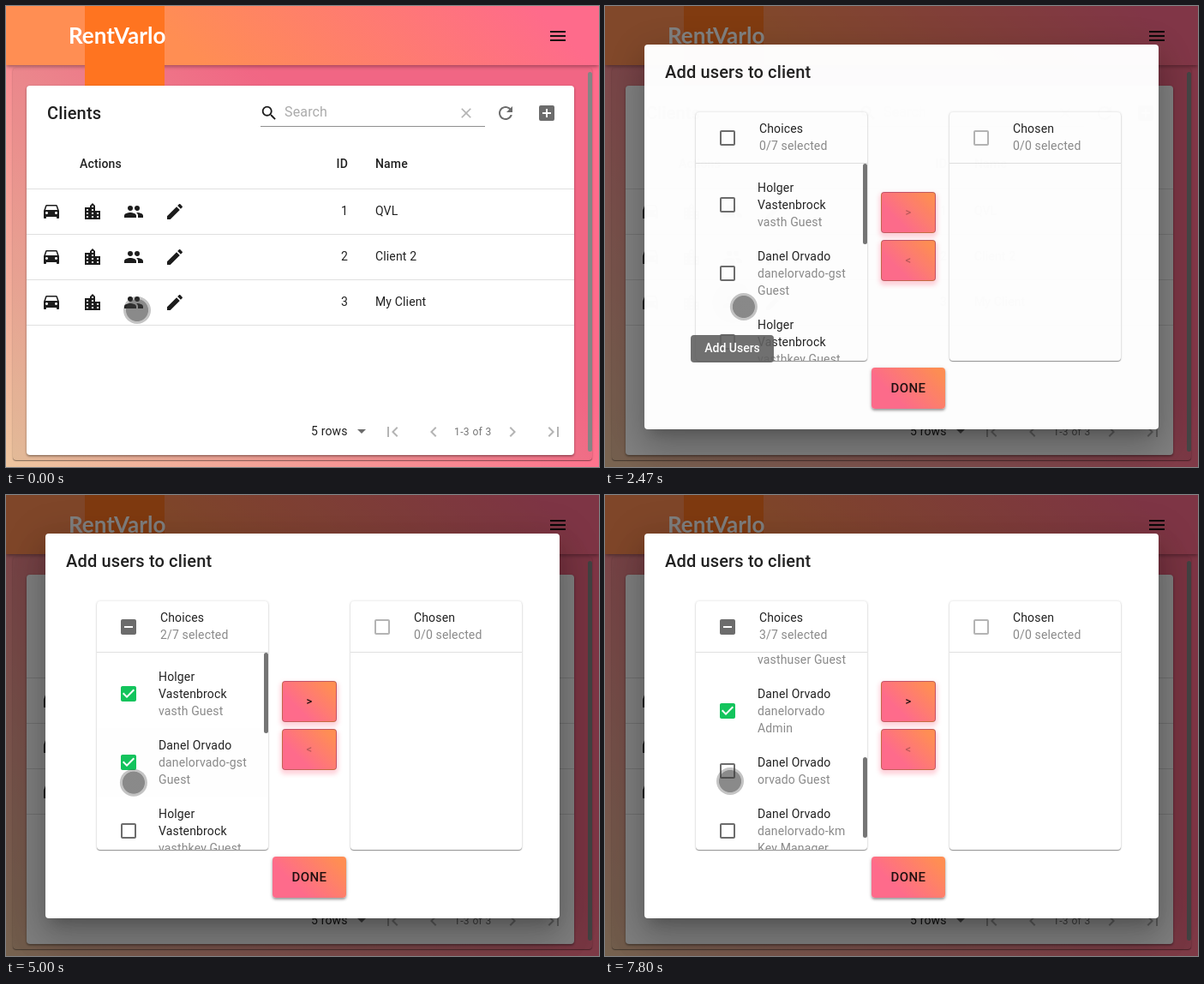
Recreate the animation shown at these times as an HTML page. Size 692 by 538 pixels, loop 8000 ms.

```html
<!DOCTYPE html>
<html lang="en">
<head>
<meta charset="utf-8">
<title>Add users to client</title>
<style>
html, body { margin: 0; width: 100%; height: 100%; overflow: hidden; }
body {
  position: relative;
  font: 14px/20px Roboto, sans-serif;
  letter-spacing: .01071em;
  color: rgba(0,0,0,.87);
  background: linear-gradient(45deg, #eec6a0, #fe6b8b 62%);
}
div, svg { position: absolute; }
.text { white-space: pre; }
.title { font-size: 20px; font-weight: 500; letter-spacing: .0075em; }
.strong { font-weight: 500; }
.muted { color: #8a8a8a; }
.header { background: linear-gradient(45deg, #ff8e53 30%, #fe6b8b 90%); box-shadow: 0 2px 4px -1px rgba(0,0,0,.3), 0 1px 6px rgba(0,0,0,.2); }
.logo { background: #ff7420; }
.brand { font: 700 26px/20px Lato, sans-serif; letter-spacing: 0; color: #fff; }
.panel { background: rgba(0,0,0,.05); border-radius: 4px; box-shadow: 0 1px 1px rgba(0,0,0,.4), 0 0 3px rgba(0,0,0,.15); }
.bar { background: #858585; border-radius: 3px; }
.card { background: #fff; border-radius: 4px; box-shadow: 0 1px 3px rgba(0,0,0,.3), 0 2px 2px rgba(0,0,0,.14); }
.list { background: #fff; border-radius: 4px; box-shadow: 0 1px 1px rgba(0,0,0,.4), 0 0 3px rgba(0,0,0,.16); }
.line { background: #e0e0e0; }
.dialog { background: #fff; border-radius: 4px; box-shadow: 0 11px 15px -7px rgba(0,0,0,.2), 0 24px 38px 3px rgba(0,0,0,.14), 0 9px 46px 8px rgba(0,0,0,.12); }
.button { box-sizing: border-box; border-radius: 4px; text-align: center; font-weight: 500; letter-spacing: .02857em; background: linear-gradient(45deg, #fe6b8b 30%, #ff8e53 90%); }
.move { border: 1px solid rgba(0,0,0,.23); font-size: 13px; line-height: 46px; box-shadow: 0 3px 5px 2px rgba(255,105,135,.3); }
.done { font-size: 15px; line-height: 48px; box-shadow: 0 2px 3px rgba(0,0,0,.35), 0 1px 5px rgba(0,0,0,.12); }
.clip { overflow: hidden; }
.ripple { border-radius: 50%; background: rgba(0,0,0,.87); }
.tip { border-radius: 4px; background: rgba(97,97,97,.9); color: #fff; text-align: center; letter-spacing: 0; }
.cursor { border-radius: 50%; background: radial-gradient(circle, rgba(60,60,60,.6) 12.6px, rgba(60,60,60,.3) 13.4px); }
</style>
</head>
<body>
<script>
const paths = {
  car: 'M18.92 5.01C18.72 4.42 18.16 4 17.5 4h-11c-.66 0-1.21.42-1.42 1.01L3 11v8c0 .55.45 1 1 1h1c.55 0 1-.45 1-1v-1h12v1c0 .55.45 1 1 1h1c.55 0 1-.45 1-1v-8l-2.08-5.99zM6.5 15c-.83 0-1.5-.67-1.5-1.5S5.67 12 6.5 12s1.5.67 1.5 1.5S7.33 15 6.5 15zm11 0c-.83 0-1.5-.67-1.5-1.5s.67-1.5 1.5-1.5 1.5.67 1.5 1.5-.67 1.5-1.5 1.5zM5 10l1.5-4.5h11L19 10H5z',
  city: 'M15 11V5l-3-3-3 3v2H3v14h18V11h-6zm-8 8H5v-2h2v2zm0-4H5v-2h2v2zm0-4H5V9h2v2zm6 8h-2v-2h2v2zm0-4h-2v-2h2v2zm0-4h-2V9h2v2zm0-4h-2V5h2v2zm6 12h-2v-2h2v2zm0-4h-2v-2h2v2z',
  people: 'M16 11a3 3 0 1 0-3-3c0 1.66 1.34 3 3 3zm-8 0a3 3 0 1 0-3-3c0 1.66 1.34 3 3 3zm0 2c-2.33 0-7 1.17-7 3.5V19h14v-2.5c0-2.33-4.67-3.5-7-3.5zm8 0c-.29 0-.62.02-.97.05 1.16.84 1.97 1.97 1.97 3.45V19h6v-2.5c0-2.33-4.67-3.5-7-3.5z',
  edit: 'M3 17.25V21h3.75L17.81 9.94l-3.75-3.75L3 17.25zM20.71 7.04c.39-.39.39-1.02 0-1.41l-2.34-2.34c-.39-.39-1.02-.39-1.41 0l-1.83 1.83 3.75 3.75 1.83-1.83z',
  search: 'M15.5 14h-.79l-.28-.27C15.41 12.59 16 11.11 16 9.5A6.5 6.5 0 1 0 9.5 16c1.61 0 3.09-.59 4.23-1.57l.27.28v.79l5 4.99L20.49 19l-4.99-5zm-6 0a4.5 4.5 0 1 1 0-9 4.5 4.5 0 0 1 0 9z',
  clear: 'M19 6.41L17.59 5 12 10.59 6.41 5 5 6.41 10.59 12 5 17.59 6.41 19 12 13.41 17.59 19 19 17.59 13.41 12z',
  refresh: 'M17.65 6.35C16.2 4.9 14.21 4 12 4c-4.42 0-7.99 3.58-7.99 8s3.57 8 7.99 8c3.73 0 6.84-2.55 7.73-6h-2.08c-.82 2.33-3.04 4-5.65 4-3.31 0-6-2.69-6-6s2.69-6 6-6c1.66 0 3.14.69 4.22 1.78L13 11h7V4l-2.35 2.35z',
  add: 'M5 3h14a2 2 0 0 1 2 2v14a2 2 0 0 1-2 2H5a2 2 0 0 1-2-2V5a2 2 0 0 1 2-2zm12 10v-2h-4V7h-2v4H7v2h4v4h2v-4z',
  first: 'M18.41 16.59L13.82 12l4.59-4.59L17 6l-6 6 6 6zM6 6h2v12H6z',
  prev: 'M15.41 7.41L14 6l-6 6 6 6 1.41-1.41L10.83 12z',
  next: 'M10 6L8.59 7.41 13.17 12l-4.58 4.59L10 18l6-6z',
  last: 'M5.59 7.41L10.18 12l-4.59 4.59L7 18l6-6-6-6zM16 6h2v12h-2z',
  menu: 'M3 18h18v-2H3v2zm0-5h18v-2H3v2zm0-7v2h18V6H3z',
  down: 'M7 10l5 5 5-5z',
  empty: 'M19 5v14H5V5h14m0-2H5c-1.1 0-2 .9-2 2v14c0 1.1.9 2 2 2h14c1.1 0 2-.9 2-2V5c0-1.1-.9-2-2-2z',
  checked: 'M19 3H5c-1.11 0-2 .9-2 2v14c0 1.1.89 2 2 2h14c1.11 0 2-.9 2-2V5c0-1.1-.89-2-2-2zm-9 14l-5-5 1.41-1.41L10 14.17l7.59-7.59L19 8l-9 9z',
  some: 'M19 3H5c-1.1 0-2 .9-2 2v14c0 1.1.9 2 2 2h14c1.1 0 2-.9 2-2V5c0-1.1-.9-2-2-2zm-2 10H7v-2h10v2z'
};
const grey = '#6c6c6c', pale = '#b4b4b4', dark = '#1c1c1c';

function box(parent, x, y, w, h, cls, html = '') {
  const el = document.createElement('div');
  el.className = cls;
  el.style.cssText = `left:${x}px;top:${y}px;width:${w}px;height:${h}px`;
  el.innerHTML = html;
  parent.append(el);
  return el;
}
// y is the middle of the first line
function text(parent, x, y, str, cls = '') {
  const el = box(parent, x, y - 10, 0, 20, 'text ' + cls, str);
  el.style.width = 'auto';
  return el;
}
function rightText(parent, x, y, str, cls = '') {
  const el = text(parent, x, y, str, cls);
  el.style.transform = 'translateX(-100%)';
}
function icon(parent, name, cx, cy, color = dark, size = 24) {
  const el = box(parent, cx - size / 2, cy - size / 2, size, size, '',
    `<svg width="${size}" height="${size}" viewBox="0 0 24 24"><path fill="${color}" d="${paths[name]}"/></svg>`);
  return el.querySelector('path');
}
function setIcon(path, name, color) {
  path.setAttribute('d', paths[name]);
  path.setAttribute('fill', color);
}

// Page
const page = box(document.body, 0, 0, 692, 538, 'clip');
box(page, 8, 72, 676, 458, 'panel');
box(page, 679, 77, 5, 443, 'bar');
box(page, 0, 0, 692, 69, 'header');
box(page, 92, 0, 93, 93, 'logo');
text(page, 73, 34, 'RentVarlo', 'brand');
icon(page, 'menu', 644, 35, '#111');
box(page, 24, 93, 639, 431, 'card');
text(page, 48, 125, 'Clients', 'title');
icon(page, 'search', 307, 125, dark, 22);
const hint = text(page, 325, 124, 'Search');
hint.style.cssText += 'font-size:16px;color:#ababab';
box(page, 297, 140, 262, 1, '').style.background = '#8f8f8f';
icon(page, 'clear', 537, 125, pale, 20);
icon(page, 'refresh', 583, 125, grey);
icon(page, 'add', 631, 125, grey);
text(page, 86, 184, 'Actions', 'strong');
rightText(page, 399, 184, 'ID', 'strong');
text(page, 431, 184, 'Name', 'strong');
box(page, 24, 213, 639, 1, 'line');
['QVL', 'Client 2', 'My Client'].forEach((name, i) => {
  const y = 239 + 53 * i;
  ['car', 'city', 'people', 'edit'].forEach((n, k) => icon(page, n, 53 + 48 * k, y + 1));
  rightText(page, 399, y, i + 1);
  text(page, 431, y, name);
  box(page, 24, y + 27, 639, 1, 'line');
});
text(page, 356, 496, '5 rows');
icon(page, 'down', 415, 496, grey);
['first', 'prev', 'next', 'last'].forEach((n, i) => icon(page, n, [451, 499, 591, 639][i], 497, pale));
text(page, 523, 497, '1-3 of 3').style.cssText += 'font-size:12px;letter-spacing:.0333em;color:#757575';
const hover = box(page, 125, 322, 48, 48, 'ripple');
const press = box(page, 126, 323, 46, 46, 'ripple');

// Dialog
const shade = box(document.body, 0, 0, 692, 538, '');
shade.style.background = 'rgba(0,0,0,.5)';
const modal = box(document.body, 0, 0, 692, 538, 'clip');
box(modal, 46, 45, 600, 449, 'dialog');
text(modal, 70, 77, 'Add users to client', 'title');

function listCard(x, title, count, color) {
  box(modal, x, 124, 200, 290, 'list');
  box(modal, x, 183, 200, 1, 'line');
  text(modal, x + 74, 143, title);
  return {
    check: icon(modal, 'empty', x + 37, 154, color),
    count: text(modal, x + 74, 163, count, 'muted')
  };
}
const choices = listCard(106, 'Choices', '', grey);
listCard(402, 'Chosen', '0/0 selected', pale);

const people = [
  ['Holger\nVastenbrock', 'vasth Guest'],
  ['Danel Orvado', 'danelorvado-gst\nGuest'],
  ['Holger\nVastenbrock', 'vasthkey Guest'],
  ['Holger\nVastenbrock', 'vasthuser Guest'],
  ['Danel Orvado', 'danelorvado\nAdmin'],
  ['Danel Orvado', 'orvado Guest'],
  ['Danel Orvado', 'danelorvado-km\nKey Manager']
];
const viewport = box(modal, 106, 184, 200, 230, 'clip');
const rows = box(viewport, 0, 0, 200, 556, '');
let rowTop = 8;
const items = people.map(([name, role]) => {
  const label = `${name}\n<span class="muted">${role}</span>`;
  const h = 20 * label.split('\n').length + 20;
  const el = box(rows, 0, rowTop, 200, h, 'clip');
  rowTop += h;
  text(el, 72, 19.5, label);
  return { el, check: icon(el, 'empty', 37, h / 2, grey) };
});
const thumb = box(viewport, 195, 0, 5, 94, 'bar');
thumb.style.background = '#757575';

const forward = box(modal, 322, 217, 64, 48, 'button move', '&gt;');
box(modal, 322, 273, 64, 48, 'button move', '&lt;').style.color = 'rgba(0,0,0,.26)';
box(modal, 311, 422, 86, 48, 'button done', 'DONE');

const smallTip = box(document.body, 117, 384, 64, 22, 'tip', 'Add Users');
smallTip.style.font = '700 10px/21px Roboto, sans-serif';
const bigTip = box(document.body, 100, 384, 97, 32, 'tip', 'Add Users');
bigTip.style.font = '500 14px/31px Roboto, sans-serif';
const cursor = box(document.body, -16, -16, 32, 32, 'cursor');

// Motion
const clamp = p => Math.min(1, Math.max(0, p));
// cubic-bezier(.4, 0, .2, 1)
function ease(p) {
  p = clamp(p);
  if (p === 0 || p === 1) return p;
  let lo = 0, hi = 1, m;
  for (let i = 0; i < 18; i++) {
    m = (lo + hi) / 2;
    const x = 1.2 * m * (1 - m) ** 2 + .6 * m * m * (1 - m) + m ** 3;
    if (x < p) lo = m; else hi = m;
  }
  return m * m * (3 - 2 * m);
}

// item, down, up, x, y
const clicks = [[0, 3520, 3670, 44, 44], [1, 4246, 4520, 34, 37.5], [4, 6640, 6720, 39, 39]].map(
  ([i, down, up, x, y]) => ({ item: items[i], down, up, x, y, wave: box(items[i].el, 0, 0, 0, 0, 'ripple') }));

// time, x, y
const route = [
  [0, 153, 355], [66, 152, 355], [200, 152, 355], [266, 152, 353], [667, 152, 353], [733, 152, 352],
  [800, 152, 352], [1000, 152, 351], [1140, 152, 351], [1733, 161, 351], [1800, 161, 351],
  [1866, 165, 350], [1934, 165, 350], [2000, 161.5, 351], [2670, 162, 351], [3200, 150, 236],
  [4000, 150, 236], [4333, 145, 315.5], [4530, 145, 316], [5200, 150, 341], [5467, 150, 341],
  [5533, 149, 343], [5800, 149, 343], [6333, 148, 350], [6400, 148, 350], [6533, 145, 351],
  [7267, 146, 351], [7400, 148, 361], [7600, 148, 277], [7800, 146, 334], [8001, 146, 334]
];
function cursorAt(t) {
  const i = Math.max(1, route.findIndex(k => k[0] > t));
  const [a, ax, ay] = route[i - 1], [b, bx, by] = route[i];
  const p = clamp((t - a) / (b - a)), s = p * p * (3 - 2 * p);
  return [ax + (bx - ax) * s, ay + (by - ay) * s];
}

function draw(t) {
  const [x, y] = cursorAt(t);
  cursor.style.transform = `translate(${x}px,${y}px)`;

  hover.style.opacity = .04 * ease((t - 830) / 150);
  const grow = ease((t - 1170) / 550);
  press.style.transform = `scale(${grow})`;
  press.style.opacity = t < 1170 ? 0 : .1 + .18 * grow;

  const shown = ease((t - 2280) / 225);
  shade.style.opacity = modal.style.opacity = shown;
  smallTip.style.opacity = t < 2320 ? ease((t - 830) / 150) : 0;
  bigTip.style.opacity = t < 2320 ? 0 : 1 - ease((t - 2690) / 195);

  let count = 0;
  for (const c of clicks) {
    const on = t >= c.up, g = ease((t - c.down) / 550), r = 172 * g;
    count += on;
    setIcon(c.item.check, on ? 'checked' : 'empty', on ? '#13c45c' : grey);
    c.wave.style.cssText = `left:${c.x - r}px;top:${c.y - r}px;width:${2 * r}px;height:${2 * r}px;` +
      `opacity:${(.1 + .2 * g) * (1 - ease((t - c.up) / 550))}`;
  }
  choices.count.textContent = count + '/7 selected';
  setIcon(choices.check, count ? 'some' : 'empty', grey);
  forward.style.color = count ? 'rgba(0,0,0,.87)' : 'rgba(0,0,0,.26)';

  const scrolled = 100 * [5000, 5850, 7000].reduce((sum, s) => sum + ease((t - s) / 260), 0);
  rows.style.transform = `translateY(${-scrolled}px)`;
  thumb.style.transform = `translateY(${scrolled * .407}px)`;
}

// The picture advances 15 times a second
const start = performance.now();
function tick() {
  const ms = (performance.now() - start) % 8000;
  draw(Math.floor((ms + 4) * .015) / .015);
  requestAnimationFrame(tick);
}
tick();
</script>
</body>
</html>
```
